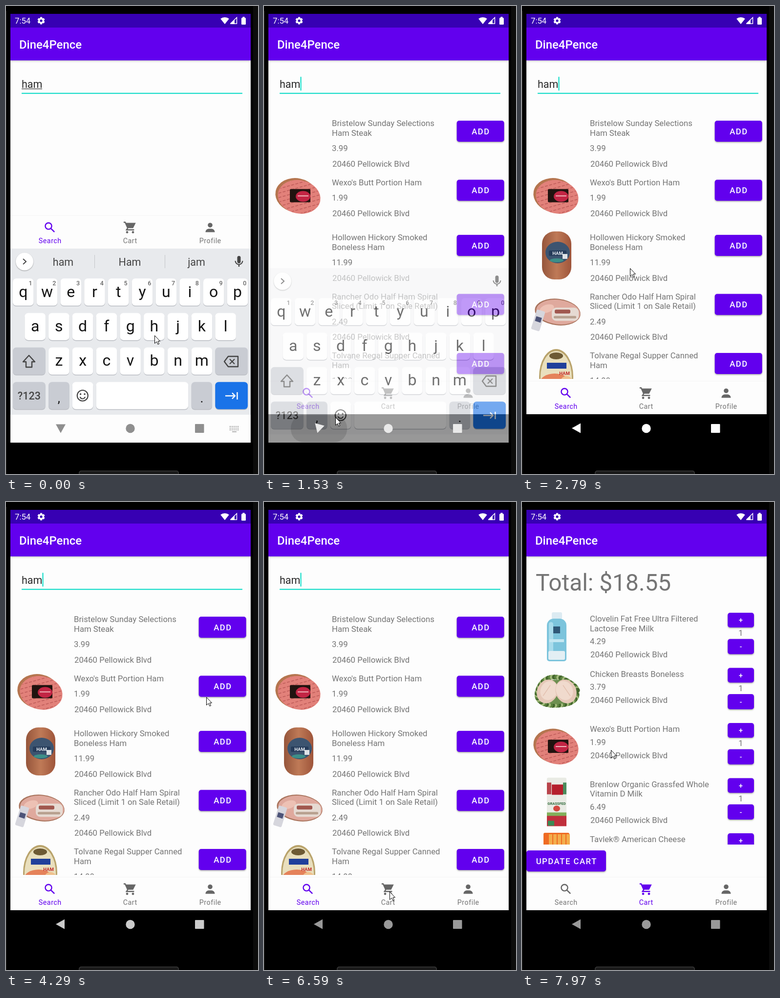
Recreate the animation shown at these times as an HTML page with a canvas. Size 516 px wide and 955 px high, loop 8 s.

```html
<!DOCTYPE html>
<html lang="en">
<head>
<meta charset="utf-8">
<title>Grocery app</title>
<style>
html, body { margin: 0; width: 100%; height: 100%; overflow: hidden; background: #000; }
canvas { display: block; }
</style>
</head>
<body>
<canvas id="stage" width="516" height="955"></canvas>
<script>
const LOOP = 8000, SP = 1.196;
const HIDE = 1410, HIDDEN = 1650, CART = 6710;
const PURPLE = '#6200ee', GREY = '#757575', PAGE = '#fdfdfd', TEAL = '#03dac5', INK = '#454545';
const ADDRESS = '20460 Pellowick Blvd';
const stage = document.getElementById('stage').getContext('2d');
let g = stage;

const clamp = v => Math.max(0, Math.min(1, v));
const ease = v => v * v * (3 - 2 * v);

function fill(color, trace) {
  g.fillStyle = color;
  g.beginPath();
  trace();
  g.fill();
}
const rect = (x, y, w, h, color, r = 0) => fill(color, () => g.roundRect(x, y, w, h, r));
const oval = (x, y, rx, ry, color, turn = 0) => fill(color, () => g.ellipse(x, y, rx, ry, turn, 0, 7));
const poly = (points, color) => fill(color, () => points.forEach(p => g.lineTo(...p)));

function line(points, color, width = 2.4) {
  g.strokeStyle = color;
  g.lineWidth = width;
  g.beginPath();
  points.forEach(p => g.lineTo(...p));
  g.stroke();
}
function arc(x, y, r, from, to, color, width = 2) {
  g.strokeStyle = color;
  g.lineWidth = width;
  g.beginPath();
  g.arc(x, y, r, from, to);
  g.stroke();
}
function text(s, x, y, sp, color, { weight = 400, align = 'left', spacing = 0 } = {}) {
  g.font = `${weight} ${sp * SP}px Roboto, sans-serif`;
  g.letterSpacing = spacing + 'px';
  g.textAlign = align;
  g.fillStyle = color;
  g.fillText(s, x + (align === 'center' ? spacing / 2 : 0), y);
}
const centered = (s, x, y, sp, color, style) => text(s, x, y, sp, color, { align: 'center', ...style });

function isolated(draw) {
  g.save();
  draw();
  g.restore();
}
function at(x, y, draw, turn = 0, scale = 1) {
  isolated(() => {
    g.translate(x, y);
    g.rotate(turn);
    g.scale(scale, scale);
    draw();
  });
}
function clipped(trace, draw) {
  isolated(() => {
    g.beginPath();
    trace();
    g.clip();
    draw();
  });
}
const within = (x, y, w, h, draw) => clipped(() => g.rect(x, y, w, h), draw);

function shadowed(blur, drop, strength, draw) {
  isolated(() => {
    g.shadowBlur = blur;
    g.shadowOffsetY = drop;
    g.shadowColor = `rgba(0,0,0,${strength})`;
    draw();
  });
}
function button(x, y, w, h, label, sp = 14, spacing = 1.5) {
  shadowed(3, 1.5, .35, () => rect(x, y, w, h, PURPLE, 4.8));
  centered(label, x + w / 2, y + h / 2 + sp * .43, sp, '#fff', { weight: 500, spacing });
}

/* Tab icons on a 24 unit grid, centred on the origin */
const icons = {
  search(color) {
    arc(-2.5, -2.5, 5.5, 0, 7, color, 2);
    line([[1.5, 1.5], [7.7, 7.7]], color, 2.1);
  },
  cart(color) {
    line([[-11, -9], [-8.4, -9], [-4, .8], [-6, 4], [7, 4]], color, 2);
    poly([[-7.7, -8], [9.8, -8], [5.3, 1], [-4, 1]], color);
    [-5, 5].forEach(x => oval(x, 8, 2, 2, color));
  },
  profile(color) {
    oval(0, -4, 4, 4, color);
    rect(-8, 2, 16, 6, color, [8, 8, 0, 0]);
  }
};

/* Product pictures, centred on the origin */
function slicedHam() {
  oval(-4, -2, 44, 35, '#b5754f', .2);
  oval(1, 1, 44, 34, '#e2817a', .2);
  clipped(() => g.ellipse(1, 1, 43, 33, .2, 0, 7), () => {
    g.setLineDash([6, 3]);
    for (let y = -45; y < 50; y += 9) line([[-50, y + 14], [50, y - 14]], '#c2605d', 1.8);
  });
  rect(-18, -15, 42, 27, '#21130f', 2);
  oval(9, 0, 15, 11, '#c22544');
  rect(-2, -2, 22, 2, '#efb9bd');
}
function smokedHam() {
  const skin = g.createLinearGradient(-31, 0, 31, 0);
  ['#94543a', '#bf7a57', '#9d5339'].forEach((c, i) => skin.addColorStop(i / 2, c));
  rect(-30, -49, 60, 98, skin, 25);
  oval(2, -6, 25, 22, '#3c5470');
  rect(-16, -10, 36, 11, '#263c5a', 2);
  centered('HAM', 2, -1, 8, '#e8eef4', { weight: 700 });
  oval(0, 10, 14, 4, '#3d8f88');
  rect(12, -3, 10, 10, '#dfe3e6');
}
function spiralHam() {
  oval(2, -5, 47, 27, '#a9745d', .12);
  oval(3, -5, 45, 25, '#dfa99d', .12);
  oval(-20, -12, 15, 8, '#edc1b4', -.3);
  rect(-10, -14, 55, 27, '#e6dad2', 9);
  rect(-4, -10, 32, 8, '#a0574e', 3);
  rect(-6, 3, 46, 5, '#b7a08e', 2);
  at(-38, 12, () => {
    rect(-9, -21, 18, 42, '#d6d6dd', 3);
    rect(-6, -7, 12, 10, '#4d5478');
  }, .3);
}
function cannedHam() {
  oval(-1, 6, 35, 56, '#b9a36b');
  oval(-1, 7, 32, 53, '#e9dfbd');
  oval(-1, -36, 14, 7, '#6d5a34');
  rect(-20, -22, 40, 12, '#203f9b');
  oval(-4, 20, 31, 20, '#e5825a');
  oval(20, 14, 11, 9, '#efc08c');
  centered('HAM', 16, 3, 8, '#c22a2a', { weight: 700 });
}
function milkBottle() {
  rect(-10, -50, 21, 14, '#dcebf2', 3);
  rect(-20, -37, 40, 87, '#7cc4dc', [14, 14, 5, 5]);
  rect(-16, -30, 9, 76, '#a9dcec', 5);
  rect(-7, -21, 14, 14, '#2f5878');
  rect(-15, 5, 30, 6, '#c4e7f2');
  rect(-17, 29, 34, 18, '#e3eff4', 3);
}
function chicken() {
  for (let i = 0; i < 60; i++) {
    const a = i * Math.PI / 30, r = 1 + .06 * Math.sin(i * 12.9);
    oval(Math.cos(a) * 41 * r, Math.sin(a) * 29 * r, 5, 5, ['#5d833f', '#a3bb7c', '#42652c'][i % 3]);
  }
  oval(0, 0, 38, 25, '#6d8f50');
  for (const side of [-1, 1]) {
    at(side * 19, -1, () => {
      oval(0, 0, 21, 25, '#e6c8b8');
      oval(-side * 2, -3, 17, 20, '#f0dacd');
      line([[0, -14], [side * 4, 12]], '#e2bfae', 1.5);
    }, -side * .45);
  }
}
function milkCarton() {
  rect(-20, -50, 40, 99, '#e9ebe4', 3);
  rect(-20, -40, 9, 24, '#b9444b');
  rect(13, -40, 7, 24, '#4a8c5c');
  rect(-10, -36, 23, 21, '#b51f2c');
  centered('GRASSFED', 0, 5, 6.3, '#2f6a3b', { weight: 700 });
  oval(0, 13, 7, 6, '#d44840');
  rect(-20, 21, 40, 9, '#82b05a');
  rect(-20, 28, 40, 21, '#c02f3c');
  rect(-18, 38, 13, 10, '#3b8a54');
}
function cheese() {
  rect(-27, -50, 53, 100, '#ef6b23', 3);
  for (let x = -16; x < 22; x += 9) rect(x, -47, 7, 97, '#f3ad4b');
}

const ham = { name: ["Wexo's Butt Portion Ham"], price: 1.99, picture: slicedHam, loaded: HIDE };
const results = [
  { name: ['Bristelow Sunday Selections', 'Ham Steak'], price: 3.99 },
  ham,
  { name: ['Hollowen Hickory Smoked', 'Boneless Ham'], price: 11.99, picture: smokedHam, loaded: 2190 },
  { name: ['Rancher Odo Half Ham Spiral', 'Sliced (Limit 1 on Sale Retail)'], price: 2.49, picture: spiralHam, loaded: 2430 },
  { name: ['Tolvane Regal Supper Canned', 'Ham'], price: 14.99, picture: cannedHam, loaded: 1800 }
];
const basket = [
  { name: ['Clovelin Fat Free Ultra Filtered', 'Lactose Free Milk'], price: 4.29, picture: milkBottle, loaded: 7190 },
  { name: ['Chicken Breasts Boneless'], price: 3.79, picture: chicken, loaded: 7190 },
  ham,
  { name: ['Brenlow Organic Grassfed Whole', 'Vitamin D Milk'], price: 6.49, picture: milkCarton, loaded: 7310 },
  { name: ['Tavlek® American Cheese'], price: 1.99, picture: cheese, loaded: 7310 }
];
const total = basket.reduce((sum, item) => sum + item.price, 0);

function product({ name, price, picture, loaded }, y, pictureY, gap, t) {
  if (t >= loaded) at(71, pictureY, picture);
  name.forEach((s, i) => text(s, 139, y + i * 19.6, 14, GREY));
  const last = y + (name.length - 1) * 19.6;
  text(price.toFixed(2), 139, last + gap, 14, GREY);
  text(ADDRESS, 140, last + gap * 2, 14, GREY);
}

function searchPage(t, bottom) {
  text('ham', 32, 167, 18, '#2b2b2b');
  rect(32, 177.3, 452, 1.9, TEAL);
  if (t < HIDE) rect(32, 168.5, 42, 1.2, '#333');
  if (Math.floor((t - 299) / 499) % 2 === 0) rect(74.5, 144.5, 2, 28, TEAL);
  if (t < 750) return;
  within(9, 200, 492, bottom - 200, () => {
    let top = 234;
    for (const item of results) {
      const lines = item.name.length;
      product(item, top + 11, top + 26 + lines * 8, 31.5, t);
      button(394.7, top, 97, 43, 'ADD');
      if (item === ham && t >= 4680 && t < 5040) {
        rect(394.7, top, 97, 43, `rgba(255,255,255,${.24 * (5040 - t) / 360})`, 4.8);
      }
      top += 104.5 + lines * 8;
    }
  });
}

function cartPage(t) {
  button(9, 711, 163, 43, 'UPDATE CART');
  if (t < CART + 120) return;
  text('Total: $' + total.toFixed(2), 28, 181, 40, GREY);
  within(9, 205, 492, 494, () => basket.forEach((item, i) => {
    const y = 244 + i * 112.5;
    product(item, y, y + 31, 26.8, t);
    button(421.2, y - 18, 53.8, 30, '+', 12, 0);
    centered('1', 448, y + 29, 14, GREY);
    button(421.2, y + 35.5, 53.8, 31, '-', 12, 0);
  }));
}

function tabs(y, active) {
  rect(9, y - 24, 492, 67, PAGE);
  rect(9, y - 25, 492, 1, '#f4f4f4');
  ['Search', 'Cart', 'Profile'].forEach((label, i) => {
    const x = 90 + i * 164, color = i === active ? PURPLE : '#666';
    at(x, y, () => icons[label.toLowerCase()](color), 0, SP);
    centered(label, x, y + 32, 12, i === active ? PURPLE : GREY, { spacing: .48 });
  });
}

/* Keyboard: column 0 to 9 across, row 0 to 3 down */
const column = i => 14 + i * 48.75;
const rowTop = i => 556 + i * 70.4;

function key(col, row, label = '', { w = 42.5, color = '#fff', sp = 26.8, drop = 37.5, weight = 400, ink = '#151515' } = {}) {
  const x = column(col), y = rowTop(row);
  rect(x, y + 1.5, w, 55.5, '#babdc3', 7);
  rect(x, y, w, 55.5, color, 7);
  centered(label, x + w / 2, y + drop, sp, ink, { weight });
}
function keyboard(full) {
  const wide = { w: 66.7, color: '#c9ccd3' }, mark = { color: '#c9ccd3', sp: 22, drop: 42 };
  rect(9, 495, 492, 339, full ? '#e8eaed' : '#f5f6f7');
  rect(9, 834, 492, 121, PAGE);
  shadowed(2, 1, .35, () => oval(38, 521.5, 18, 18, '#fff'));
  line([[35, 516], [41, 521.5], [35, 527]], INK, 2);
  rect(473.5, 510, 7, 15, INK, 3.5);
  arc(477, 520, 7.5, 0, Math.PI, INK);
  line([[477, 527], [477, 532]], INK);
  if (full) {
    ['ham', 'Ham', 'jam'].forEach((s, i) => centered(s, 117 + i * 136.5, 530, 18, INK));
    [181, 325].forEach(x => rect(x, 508, 1, 27, '#c3c5c9'));
  }
  ['qwertyuiop', 'asdfghjkl', 'zxcvbnm'].forEach((row, r) => [...row].forEach((c, i) => {
    key(i + [0, .5, 1.5][r], r, c);
    if (r === 0) centered((i + 1) % 10, column(i) + 36, 570, 10.5, '#666', { weight: 500 });
  }));
  g.lineJoin = 'round';
  key(0, 2, '', wide);
  at(47, 725, () => line([[0, -12], [-12, 1], [-6, 1], [-6, 12], [6, 12], [6, 1], [12, 1], [0, -12], [-1, -11]], INK));
  key(8.5, 2, '', wide);
  at(463, 725.5, () => {
    line([[-16, 0], [-8, -10.5], [12, -10.5], [12, 10.5], [-8, 10.5], [-16, 0], [-15, -1]], INK);
    [-1, 1].forEach(s => line([[-5, -5 * s], [5, 5 * s]], INK, 2.2));
  });
  key(0, 3, '?123', { ...wide, sp: 18, drop: 36, weight: 500, ink: INK });
  key(1.5, 3, ',', mark);
  key(2.5, 3);
  at(156.8, 795, () => {
    arc(0, 0, 11, 0, 7, INK, 2.2);
    [-4.2, 4.2].forEach(x => oval(x, -3, 1.8, 1.8, INK));
    arc(0, 1, 5.5, .3, 2.84, INK, 2.2);
  });
  key(3.5, 3, '', { w: 188.5 });
  key(7.5, 3, '.', mark);
  key(8.5, 3, '', { ...wide, color: '#1a73e8' });
  at(468, 795.5, () => {
    line([[-19, 0], [0, 0]], '#fff');
    line([[-5, -6], [1, 0], [-5, 6]], '#fff');
    line([[5.5, -7.5], [5.5, 7.5]], '#fff');
  });
}

// Flattened copy, so the closing keyboard fades as a single sheet.
const sheet = document.createElement('canvas');
sheet.width = 516;
sheet.height = 955;
g = sheet.getContext('2d');
keyboard(false);
g = stage;

function closingKeyboard(t) {
  const alpha = .8 - .2 * Math.floor((t - HIDE) / 120);
  within(9, 495, 492, 396, () => {
    g.globalAlpha = alpha;
    g.drawImage(sheet, 0, (1 - alpha) * 100);
  });
}

function systemBar(t) {
  const open = t < HIDE;
  const shade = open ? 143 : t < HIDDEN ? 233 : 255 - 102 * clamp((t - 3500) / 1540);
  const color = `rgb(${shade},${shade},${shade})`;
  if (open) {
    for (let i = 0; i < 15; i++) rect(458 + i % 5 * 4, 857 + Math.floor(i / 5) * 3.5, 2, 2, '#999');
    rect(463, 868, 9, 1.5, '#999');
  } else if (t < HIDDEN) {
    rect(55, 835, 115, 55, 'rgba(0,0,0,.12)', 26);
  }
  const turn = clamp((t - 1480) / 300) - 1;
  at(112, 861.5, () => poly([[-10, 0], [8, -10], [8, 10]], color), turn * Math.PI / 2);
  oval(254.5, 862, 9.2, 9.2, color);
  rect(387, 853, 18.5, 18, color, 1);
}

function statusBar() {
  rect(9, 16, 492, 28, '#3700b3');
  text('7:54', 18, 36, 14, '#fff');
  for (let i = 0; i < 3; i++) at(72, 30, () => rect(-2.2, -7.5, 4.4, 15, '#fff', 1), i * Math.PI / 3);
  oval(72, 30, 5.8, 5.8, '#fff');
  oval(72, 30, 2.6, 2.6, '#3700b3');
  fill('#fff', () => {
    g.moveTo(448, 37);
    g.arc(448, 37, 14, -2.25, -.89);
  });
  line([[459.5, 36], [472.5, 36], [472.5, 23.5], [459.5, 36]], '#fff', 1.5);
  poly([[459, 37], [468, 37], [468, 28]], '#fff');
  rect(482, 24, 9, 14, '#fff', 1.5);
  rect(484.5, 22, 4, 3, '#fff');
}

function phone() {
  rect(0, 0, 516, 955, '#000');
  rect(0, 10, 1.5, 945, '#191917');
  rect(506, 0, 10, 955, '#0c0c0b');
  rect(149, 948, 205, 12, '#3a3a3a', 5);
  rect(150.5, 949.5, 202, 12, '#191919', 4);
}

// Each move: start time, duration and where the pointer comes to rest.
const moves = [
  [0, 240, 266, 619], [640, 620, 104, 884], [1260, 270, 146, 839], [1530, 270, 273, 640],
  [1800, 390, 221, 535], [2900, 1390, 410, 398], [4290, 240, 430, 383], [5440, 250, 408, 379],
  [5690, 540, 257, 795], [6950, 1020, 182, 506]
];
function pointer(t) {
  let x = 304, y = 672;
  for (const [start, duration, toX, toY] of moves) {
    const k = ease(clamp((t - start) / duration));
    x += (toX - x) * k;
    y += (toY - y) * k;
  }
  at(Math.round(x) + .5, Math.round(y) + .5, () => {
    const arrow = [[0, 0], [0, 16], [4, 12.5], [6.5, 18], [9, 17], [6.5, 11.5], [11, 11.5], [0, 0]];
    poly(arrow, '#fff');
    line(arrow, '#000', 1);
  });
}

function draw(t) {
  const typing = t < HIDE, shopping = t >= CART;
  phone();
  rect(9, 111, 492, 722, PAGE);
  if (shopping) cartPage(t);
  else searchPage(t, typing ? 423 : 761);
  tabs(typing ? 452 : 790, shopping ? 1 : 0);
  within(9, 44, 492, 80, () => shadowed(4, 1, .28, () => rect(9, 44, 492, 67, PURPLE)));
  statusBar();
  text('Dine4Pence', 27, 87, 20, '#fff', { weight: 500 });
  if (typing) within(9, 495, 492, 396, () => keyboard(true));
  else if (t < HIDDEN) closingKeyboard(t);
  systemBar(t);
  pointer(t);
}

function tick() {
  draw(performance.now() % LOOP);
  requestAnimationFrame(tick);
}
tick();
</script>
</body>
</html>
```
